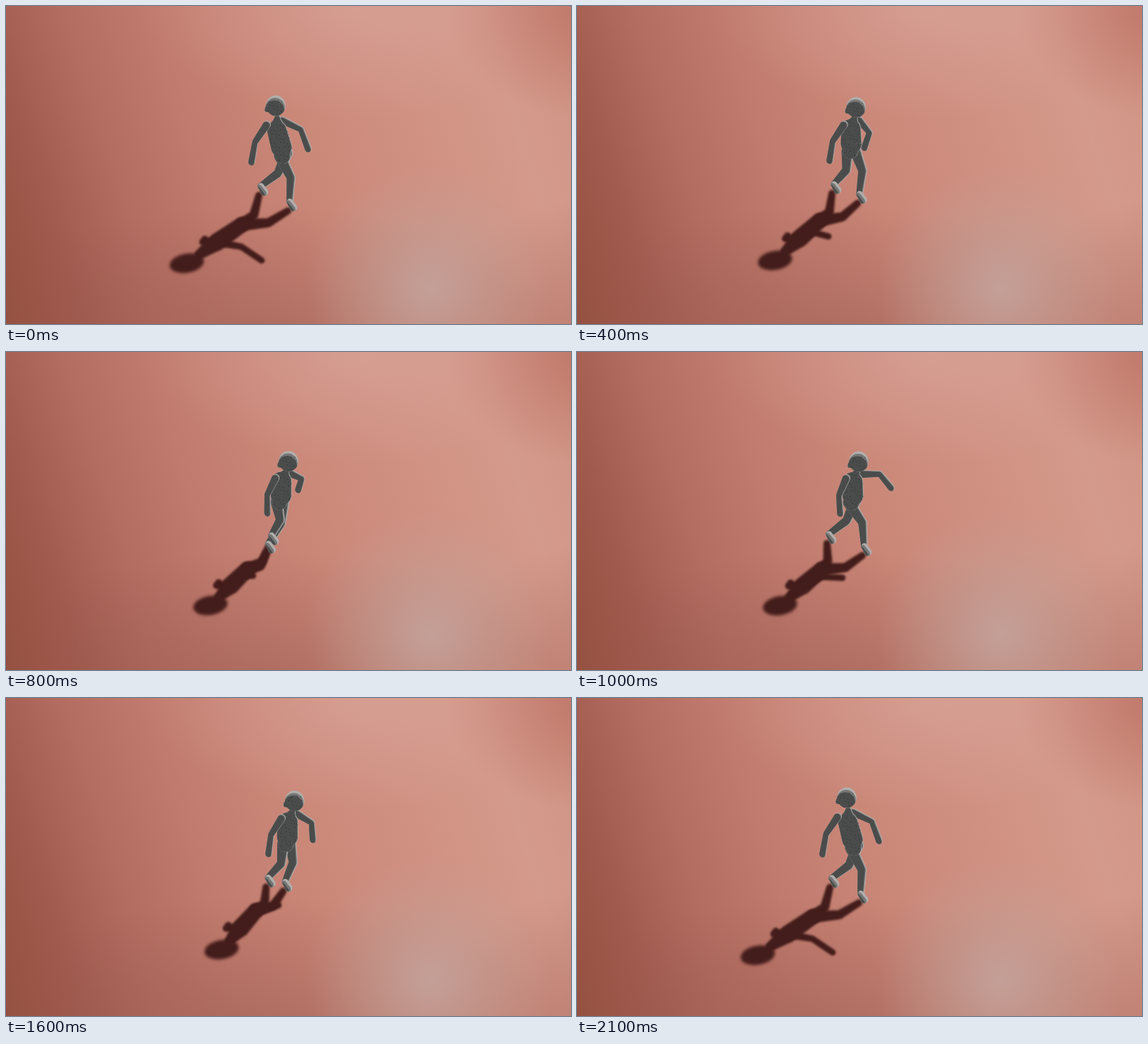
Animation of 800x450 px, one loop 2.2 s. Source, as an HTML page with a canvas:

```html
<!DOCTYPE html>
<html lang="en">
<head>
<meta charset="utf-8">
<title>Walking figure</title>
<style>
  html, body { margin: 0; width: 100%; height: 100%; overflow: hidden; }
  body {
    background:
      radial-gradient(circle 175px at 600px 400px, rgba(195,166,160,.8), rgba(194,160,152,.5) 45%, rgba(192,148,138,0)),
      radial-gradient(ellipse 210px 160px at 830px 0, rgba(180,98,86,.6), rgba(185,105,92,0)),
      radial-gradient(ellipse 300px 160px at 500px 0, rgba(220,172,163,.5), rgba(215,160,150,0)),
      radial-gradient(ellipse 260px 190px at 850px 460px, rgba(165,98,88,.5), rgba(170,104,94,0)),
      radial-gradient(ellipse 430px 200px at 370px 480px, rgba(155,90,80,.55), rgba(165,96,86,0)),
      linear-gradient(72deg, #94503f 0, #a15b4f 12%, #b26c60 23%, #c07b6e 36%, #ca8778 52%, #d09182 70%, #d49a8b 86%, #d09484 100%);
  }
  canvas { display: block; width: 800px; height: 450px; }
</style>
</head>
<body>
<canvas id="stage" width="800" height="450"></canvas>
<script>
const LOOP = 2200, STEP = 100, CYCLE = 2100;
const LIGHT = '#b0aeac', MID = '#757675', DARK = '#4a4c4b', SHADE = '#431d1b';

// Key poses: time, then x,y of head, hip, right hand, far ankle, near ankle.
const poses = [
  [0,    382,141, 392,212, 428,202, 361,255, 402,277],
  [200,  388,135, 388,202, 432,202, 400,250, 387,265],
  [600,  401,152, 387,210, 389,198, 392,280, 350,245],
  [1000, 399,155, 389,213, 445,192, 357,258, 407,275],
  [1300, 409,150, 399,206, 451,192, 404,240, 409,258],
  [1800, 405,143, 394,208, 425,205, 384,272, 354,256]
];

const ctx = document.getElementById('stage').getContext('2d');

const add = ([x, y], dx, dy) => [x + dx, y + dy];
const mix = ([ax, ay], [bx, by], k) => [ax + (bx - ax) * k, ay + (by - ay) * k];

// Elbow or knee: the midpoint pushed sideways.
function bend(a, b, amount) {
  const dx = b[0] - a[0], dy = b[1] - a[1], k = amount / Math.hypot(dx, dy);
  return add(mix(a, b, 0.5), dy * k, -dx * k);
}

function key(i) {
  const n = poses.length, turn = Math.floor(i / n);
  const [time, ...values] = poses[i - turn * n];
  return { time: time + turn * CYCLE, values };
}

// Cyclic cubic interpolation between the key poses.
function interpolate(t) {
  t %= CYCLE;
  let i = 0;
  while (key(i + 1).time <= t) i++;
  const [p, a, b, n] = [i - 1, i, i + 1, i + 2].map(key);
  const span = b.time - a.time, u = (t - a.time) / span, v = 1 - u;
  const values = a.values.map((from, j) => {
    const to = b.values[j];
    const out = 0.8 * span * (to - p.values[j]) / (b.time - p.time);
    const into = 0.8 * span * (n.values[j] - from) / (n.time - a.time);
    return v * v * (1 + 2 * u) * from + u * u * (1 + 2 * v) * to + u * v * (v * out - u * into);
  });
  return [0, 2, 4, 6, 8].map(j => values.slice(j, j + 2));
}

function skeleton(t) {
  const [head, hip, rightHand, farAnkle, nearAnkle] = interpolate(t);
  const neck = mix(head, hip, 0.25);
  const chest = add(mix(head, hip, 0.49), -3, 0);
  const sway = Math.cos(2 * Math.PI * t / CYCLE);
  const leftHand = add(chest, -27 - 9 * sway, 45);
  const limb = (a, b, amount) => [a, bend(a, b, amount), b];
  return {
    head, hip, neck, chest,
    belly: mix(head, hip, 0.82),
    leftArm: limb(add(neck, -15, 9), leftHand, -6),
    rightArm: limb(add(neck, 7, 3), rightHand, 11),
    farLeg: limb(add(hip, 6, -4), farAnkle, 8),
    nearLeg: limb(add(hip, -4, 0), nearAnkle, 9)
  };
}

function disc(path, x, y, rx, ry = rx, turn = 0) {
  path.moveTo(x + rx * Math.cos(turn), y + rx * Math.sin(turn));
  path.ellipse(x, y, rx, ry, turn, 0, 2 * Math.PI);
}

// Tapered tube through the points, with one radius per point.
function tube(points, radii) {
  const path = new Path2D();
  points.forEach(([x, y], i) => {
    disc(path, x, y, radii[i]);
    if (!i) return;
    const [px, py] = points[i - 1], a = Math.atan2(y - py, x - px);
    const nx = -Math.sin(a), ny = Math.cos(a), p = radii[i - 1], r = radii[i];
    path.moveTo(px - nx * p, py - ny * p);
    path.lineTo(x - nx * r, y - ny * r);
    path.lineTo(x + nx * r, y + ny * r);
    path.lineTo(px + nx * p, py + ny * p);
    path.closePath();
  });
  return path;
}

// Lit edge at the upper right, dark side shifted away from the light.
function shaded(path, dx, dy) {
  ctx.save();
  ctx.fillStyle = LIGHT;
  ctx.fill(path);
  ctx.clip(path);
  for (const color of [MID, DARK]) {
    ctx.translate(dx / 2, dy / 2);
    ctx.fillStyle = color;
    ctx.fill(path);
  }
  ctx.restore();
}

function speckle(path, [cx, cy], w, h) {
  ctx.save();
  ctx.clip(path);
  ctx.fillStyle = 'rgba(25,27,27,.5)';
  for (let row = -h; row <= h; row += 6)
    for (let col = -w; col <= w; col += 6) {
      const jitter = Math.sin(row * 12.9 + col * 78.2) * 1.4;
      ctx.fillRect(cx + col + jitter, cy + row - jitter, 1.2, 1.2);
    }
  ctx.restore();
}

// The body line is laid on the ground, from between the feet to the head's shadow.
function drawShadow(body) {
  const { head, chest, rightArm, farLeg, nearLeg } = body;
  const lean = head[0] - 382;
  const top = [256 + 1.85 * lean, 364 - 0.3 * lean];
  const ground = add(mix(farLeg[2], nearLeg[2], 0.5), 0, 10);
  const [hip, ribs, neck] = [0.38, 0.66, 0.86].map(k => mix(ground, top, k));
  const fill = path => ctx.fill(path);

  ctx.save();
  ctx.fillStyle = SHADE;
  ctx.filter = 'blur(1.5px)';
  for (const leg of [farLeg, nearLeg]) {
    const foot = add(leg[2], -3, 13);
    fill(tube([hip, add(mix(hip, foot, 0.5), 5, 7), foot], [9, 6.5, 5]));
  }
  const reach = 0.9 * (rightArm[2][0] - chest[0] + rightArm[2][1] - chest[1]);
  const hand = add(ribs, reach, 26 - 2.2 * lean);
  fill(tube([ribs, bend(ribs, hand, 7), hand], [6, 4.5, 4.5]));
  fill(tube([ribs, add(ribs, -20, 0), add(ribs, -17, -4)], [7, 5, 5]));
  fill(tube([neck, ribs, hip], [7, 12.5, 11]));
  ctx.filter = 'blur(2.2px)';
  const skull = new Path2D();
  disc(skull, ...top, 24.5, 13.5, -0.17);
  fill(skull);
  ctx.restore();
}

function drawFigure(body) {
  const { head, neck, chest, belly, hip } = body;
  const arm = points => shaded(tube(points, [5.5, 4.3, 4.8]), -1.6, 1.4);
  const leg = points => {
    const ankle = points[2];
    shaded(tube(points, [8.5, 6.3, 4.8]), -2.4, 0.5);
    shaded(tube([ankle, add(ankle, 5, 8)], [4.4, 5.4]), -5, 5);
  };

  arm(body.rightArm);
  leg(body.farLeg);
  leg(body.nearLeg);

  const torso = tube([neck, chest, belly, hip], [4.5, 14, 15, 11]);
  shaded(torso, -1.2, 0.8);
  speckle(torso, belly, 15, 30);
  arm(body.leftArm);

  const [x, y] = head;
  const skull = new Path2D();
  disc(skull, x, y, 13.8, 14.5);
  disc(skull, x - 12, y + 5, 4);
  shaded(skull, -2, 7);
  speckle(skull, [x, y + 4], 10, 10);
}

function frame() {
  const t = Math.floor(performance.now() % LOOP / STEP) * STEP;
  const body = skeleton(t);
  ctx.clearRect(0, 0, 800, 450);
  drawShadow(body);
  drawFigure(body);
  requestAnimationFrame(frame);
}
frame();
</script>
</body>
</html>
```
